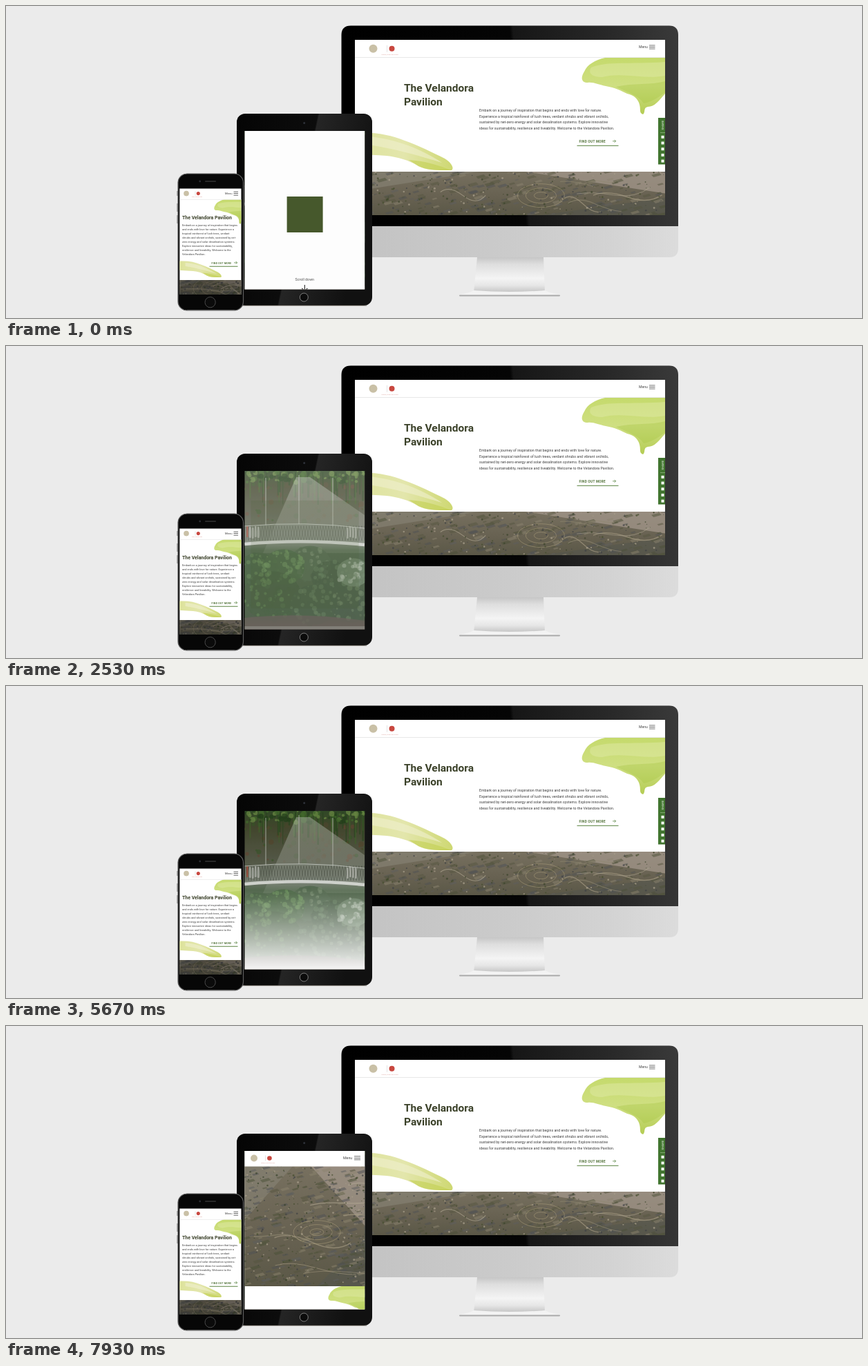
These frames come from a looping animation (1239 px wide and 452 px high, 8000 ms). An HTML page:

```html
<!DOCTYPE html>
<html lang="en">
<head>
<meta charset="utf-8">
<title>Responsive pavilion site</title>
<style>
html, body { margin: 0; width: 100%; height: 100%; overflow: hidden; background: #ebebeb; }
#stage { display: block; width: 100vw; height: 100vh; font-family: Roboto, "Open Sans", sans-serif; }
</style>
</head>
<body>
<svg id="stage" viewBox="0 0 1239 452"></svg>
<script>
const LOOP = 8000;
const NAME = 'Velandora';
const stage = document.getElementById('stage');
const clamp = v => Math.max(0, Math.min(1, v));
const ramp = (t, a, b) => clamp((t - a) / (b - a));

function seeded(seed) {
  return (a = 0, b = 1) => {
    seed = (seed * 16807) % 2147483647;
    return a + (b - a) * seed / 2147483647;
  };
}

// Markup helpers
const rect = (x, y, w, h, fill, more = '') => `<rect x="${x}" y="${y}" width="${w}" height="${h}" fill="${fill}" ${more}/>`;
const dot = (x, y, r, fill, more = '') => `<circle cx="${x}" cy="${y}" r="${r}" fill="${fill}" ${more}/>`;
const shape = (d, fill, more = '') => `<path d="${d}" fill="${fill}" ${more}/>`;
const line = (d, color, width = 1, more = '') => `<path d="${d}" fill="none" stroke="${color}" stroke-width="${width}" ${more}/>`;
const text = (x, y, s, size, fill, more = '') => `<text x="${x}" y="${y}" font-size="${size}" fill="${fill}" ${more}>${s}</text>`;
const group = (id, body, more = '') => `<g id="${id}" ${more}>${body}</g>`;
const screen = (x, y, w, h, body) =>
  `<svg x="${x}" y="${y}" width="${w}" height="${h}" viewBox="${x} ${y} ${w} ${h}">${body}</svg>`;
const gradient = (id, stops, dir = 'x2="0" y2="1"') => `<linearGradient id="${id}" ${dir}>` +
  stops.map(([at, color, alpha = 1]) => `<stop offset="${at}" stop-color="${color}" stop-opacity="${alpha}"/>`).join('') +
  '</linearGradient>';
const title = (x, y, s, size) => text(x, y, s, size, '#3b4129', 'font-weight="700"');
const lines = (x, y, step, size, rows) => rows.map((s, i) => text(x, y + i * step, s, size, '#3c3c3c')).join('');
const leaf = (x, y, k) => `<use href="#leaf" transform="translate(${x} ${y}) scale(${k})"/>`;
const swoosh = (x, y, k) => `<use href="#swoosh" transform="translate(${x} ${y}) scale(${k})"/>`;

const defs = `<defs>
  ${gradient('bezel', [[0, '#000'], [.5, '#050505'], [.51, '#161616'], [.8, '#292929'], [1, '#3a3a3a']], 'x1="0" y1=".05" x2="1" y2="0"')}
  ${gradient('chin', [[0, '#c2c2c2'], [.5, '#cbcbcb'], [.8, '#d3d3d3'], [1, '#dcdcdc']], '')}
  ${gradient('neck', [[0, '#c6c6c6'], [.2, '#dedede'], [.6, '#f4f4f4'], [.8, '#e6e6e6'], [1, '#c4c4c4']])}
  ${gradient('glass', [[0, '#050505'], [.55, '#0c0c0c'], [.56, '#252525'], [1, '#111']], 'x2="1" y2=".3"')}
  ${gradient('lime', [[0, '#c5da6c'], [.5, '#cfdf82'], [1, '#b4cc54']])}
  ${gradient('straw', [[0, '#dde39c'], [.5, '#e3e6ac'], [1, '#ced872']], '')}
  ${gradient('mist', [[0, '#fff', 0], [.45, '#fff', .5], [.8, '#fff', .9], [1, '#fff', 1]])}
  ${gradient('land', [[0, '#77705f'], [.55, '#686252'], [1, '#5b5847']])}
  ${gradient('grove', [[0, '#35502a'], [.1, '#474c30'], [.3, '#5a5e4b'], [.45, '#667060'], [.5, '#375230'], [.92, '#2b4225'], [1, '#4a4038']])}
  ${gradient('beam', [[0, '#c3cabf', .45], [1, '#dfe4dc', .1]])}
  <g id="leaf">
    ${shape('M121 0H34C20 3 8 10 4 20C-1 28 -1 36 9 36C18 35 24 39 35 41C48 43 58 48 66 52C76 54 82 60 84 68C86 75 83 80 89 82C93 79 89 72 96 71C106 71 112 62 121 52Z', 'url(#lime)')}
    ${shape('M14 14C40 4 70 10 121 6V26C90 32 60 20 30 28C18 28 8 24 14 14Z', '#dfe8a8', 'opacity=".45"')}
    ${shape('M50 42C75 36 100 40 121 34V50C108 60 100 64 90 66C82 54 66 50 50 42Z', '#a9c546', 'opacity=".4"')}
  </g>
  <g id="swoosh">
    ${shape('M0 3C28 1 52 6 72 14C92 21 112 31 130 40C140 46 144 54 140 57C124 57 106 58 92 51C78 42 62 38 46 36C30 35 14 34 0 33Z', 'url(#straw)')}
    ${shape('M20 8C60 12 96 26 126 46C100 38 60 26 20 20Z', '#f0f1cf', 'opacity=".6"')}
    ${shape('M78 42C100 43 122 50 140 57C124 57 106 58 92 51Z', '#c3d052', 'opacity=".6"')}
  </g>
</defs>`;

// Aerial view: tinted ground, lots in rows, winding roads and trees
function aerial(x, y, w, h, count, seed) {
  const rnd = seeded(seed);
  const pick = list => list[Math.floor(rnd(0, list.length))];
  let out = rect(x, y, w, h, 'url(#land)');
  out += shape(`M${x + w * .55} ${y}H${x + w}V${y + h * .5}Z`, '#a2968a', 'opacity=".75"');
  out += shape(`M${x} ${y}H${x + w * .4}L${x} ${y + h * .45}Z`, '#858072', 'opacity=".7"');
  out += shape(`M${x + w * .6} ${y + h}L${x + w} ${y + h * .6}V${y + h}Z`, '#55574f', 'opacity=".6"');
  for (let i = 0; i < count; i++) {
    const bx = x + rnd(-.05, 1) * w, by = y + rnd(0, 1) * h, s = rnd(2, 7);
    out += shape(`M${bx} ${by}l${s * 1.8} ${-s * .5}l${s * .5} ${s * .5}l${-s * 1.8} ${s * .5}Z`,
      pick(['#4f5154', '#5d5e5e', '#4b5037', '#8c836f', '#55553f']), 'opacity=".5"');
  }
  for (let i = 0; i < 7; i++) {
    const px = x + rnd(0, 1) * w, py = y + rnd(.1, .9) * h, reach = rnd(25, 60);
    out += line(`M${px} ${py}q${reach * .4} ${rnd(-14, 2)} ${reach} ${rnd(-4, 8)}t${reach} ${rnd(-16, 16)}`,
      pick(['#a89d84', '#b3a994', '#8f8770']), rnd(.7, 1.6), 'opacity=".65"');
  }
  for (let i = 0; i < 3; i++)
    out += `<ellipse cx="${x + w * .6}" cy="${y + h * .55}" rx="${10 + i * 12}" ry="${5 + i * 6}" fill="none" stroke="#b0a27e" opacity=".5"/>`;
  for (let i = 0; i < count; i++)
    out += dot(x + rnd(0, w), y + rnd(0, h), rnd(.5, 1.5), pick(['#3a432b', '#454d2e', '#a99f8b', '#3f4044']), 'opacity=".7"');
  return screen(x, y, w, h, out);
}

// Indoor garden with a footbridge
function garden() {
  const rnd = seeded(77);
  const tree = (cx, cy, r, dark, light) => {
    let s = `<ellipse cx="${cx}" cy="${cy}" rx="${r}" ry="${r * .85}" fill="${dark}" opacity=".75"/>`;
    for (let i = 0; i < r * 2.2; i++) {
      const a = rnd(0, 6.28), d = r * Math.sqrt(rnd());
      const dy = Math.sin(a) * d * .85;
      s += dot(cx + Math.cos(a) * d, cy + dy, rnd(1, 4), rnd(-1, 1) * r > dy ? light : dark, 'opacity=".55"');
    }
    return s;
  };
  let out = rect(345, 181, 175, 230, 'url(#grove)');
  for (let i = 0; i < 90; i++) {
    const x = rnd(346, 519);
    out += dot(x, rnd(200, 255), rnd(1, 4), ['#5a4a2e', '#3b5a2b', '#6d4a36'][i % 3], `opacity="${x < 400 || x > 490 ? .6 : .25}"`);
  }
  for (let i = 0; i < 46; i++)
    out += line(`M${rnd(346, 519)} 183v${rnd(10, 48)}`, i % 2 ? '#456b30' : '#2b4a20', rnd(1, 3), 'opacity=".6"');
  for (let i = 0; i < 90; i++)
    out += dot(rnd(346, 519), rnd(181, 198), rnd(1, 4), ['#26451d', '#47712f', '#6f9147'][i % 3], 'opacity=".75"');
  out += shape('M420 190H440L519 245V300H372Z', 'url(#beam)');
  out += line('M376 191V260M424 187V258M473 191V262', '#d0d2ca', .8);
  out += shape('M345 262Q432 252 519 264V287Q432 278 345 287Z', '#8a9184', 'opacity=".5"');
  for (let x = 347; x < 519; x += 4) out += line(`M${x} 261l4 21m0 -22l-4 22`, '#3f463c', .4);
  for (let i = 0; i < 9; i++)
    out += rect(348 + i * 4 + (i > 4 ? 125 : 0), 261 + i % 3, 2.5, 16, i ? '#c9cbc3' : '#b54836', 'rx="1" opacity=".7"');
  out += tree(440, 315, 30, '#3a5634', '#6b8460') + tree(470, 335, 28, '#2a4426', '#4e6f45') +
    tree(365, 325, 30, '#294a22', '#4f7d3c') + tree(402, 320, 30, '#2f5327', '#5c8a47') +
    tree(385, 362, 42, '#26441f', '#4a7638') + tree(445, 375, 34, '#2a4625', '#4a6b40') +
    tree(500, 375, 30, '#2a4327', '#56744c') + tree(503, 328, 24, '#5e7a58', '#b3c2ac');
  out += line('M345 261Q432 253 519 264', '#d9dcd6', .8);
  out += line('M345 287Q432 279 519 288', '#dcdfd9', 4.5);
  out += shape('M345 394Q430 385 519 398V411H345Z', '#4b4038', 'opacity=".75"');
  return out + rect(345, 406, 175, 5, '#8d8f86', 'opacity=".5"');
}

const burger = (x, y, w, gap) => [-gap, 0, gap].map(d => rect(x, y + d - .4, w, .8, '#444')).join('');

function header(x, y, k, menuX, menuSize, barX, barW, menuY) {
  return dot(x, y, 6 * k, '#c9c0a6') +
    dot(x + 27 * k, y, 4 * k, '#c8473f') +
    rect(x + 20 * k, y - 5 * k, .4, 10 * k, '#bbb') +
    text(x + 12 * k, y + 9 * k, 'Gather, grow and share', 2.4 * k, '#d89a94') +
    text(menuX, menuY + menuSize * .35, 'Menu', menuSize, '#444') + burger(barX, menuY, barW, 2.5);
}

function button(x, y, size, width, arrowX) {
  return text(x, y, 'FIND OUT MORE', size, '#4b6d32', 'font-weight="700" letter-spacing=".35"') +
    line(`M${arrowX} ${y - 1.7}h4.6m-2 -2l2 2l-2 2`, '#4b7a33', .7) +
    rect(x - 3, y + size * .95, width, 1, '#5b8442');
}

function monitor() {
  let page = rect(505, 49, 449, 254, '#fff') + leaf(833, 75, 1) + swoosh(505, 181, 1) +
    rect(505, 74, 449, .8, '#e3e3e3') + header(531.5, 61.8, 1, 916, 5.1, 931, 8.5, 59.5) +
    title(576, 124, `The ${NAME}`, 15.5) + title(576, 144, 'Pavilion', 15.5) +
    lines(685, 153, 8.67, 5.27, [
      'Embark on a journey of inspiration that begins and ends with love for nature.',
      'Experience a tropical rainforest of lush trees, verdant shrubs and vibrant orchids,',
      'sustained by net-zero energy and solar desalination systems. Explore innovative',
      `ideas for sustainability, resilience and liveability. Welcome to the ${NAME} Pavilion.`]) +
    button(829.5, 197.5, 4.6, 60, 878) + aerial(505, 240, 449, 63, 260, 4242) +
    rect(944, 162, 10, 67.5, '#41752f') +
    text(0, 0, 'SHARE', 4, '#fff', 'transform="translate(952.4 179.5) rotate(-90)" letter-spacing=".3"') +
    rect(947, 183, 7, .6, '#a9c59c');
  for (let i = 0; i < 5; i++) page += rect(948.5, 187.8 + i * 8.7, 4, 4, '#fff');
  return shape('M682 364H778L780 415H677Z', 'url(#neck)') +
    shape('M677 412Q728 416 780 412Q788 416 802 418V420H656V418Q670 416 677 412Z', '#f3f3f3') +
    rect(656, 418.6, 146, 1.8, '#a9a9a9', 'rx=".8"') +
    shape('M485.5 318H973V351Q973 364 960 364H498.5Q485.5 364 485.5 351Z', 'url(#chin)') +
    shape('M485.5 319V42Q485.5 28.5 499 28.5H960Q973 28.5 973 42V319Z', 'url(#bezel)') +
    screen(505, 49, 449, 254, page);
}

function tablet() {
  const captions = [
    ['NATURE', 'Living in harmony with the green all around us'],
    ['NURTURE', 'Growing and sharing the ideas of our people'],
    ['FUTURE', 'Innovating and shaping the future of the world']
  ].map(([head, sub], i) => {
    const y = 252 + (i - 2) * 230;
    return text(352, y, head, 11, '#fff', 'font-weight="700" letter-spacing=".8"') +
      text(352, y + 10, sub, 5.2, '#fff', 'letter-spacing=".4" opacity=".75"');
  }).join('');

  const controls = line('M416 407h-5m2 -2l-2 2l2 2M449 407h5m-2 -2l2 2l-2 2', '#fff', .9) +
    [426, 432.4, 438.8].map(x => dot(x, 407, 1.9, '#fff')).join('');

  const page = rect(345, 53, 175, 166, 'url(#mist)') + rect(345, 218.5, 175, 500, '#fff') +
    group('blot', leaf(-52, 0, .585)) + group('stroke', swoosh(0, 0, .585)) +
    title(352, 265.3, `The ${NAME} Pavilion`, 9) +
    lines(352, 278.7, 7.8, 5.06, [
      'Embark on a journey of inspiration that begins and ends with love for',
      'nature. Experience a tropical rainforest of lush trees, verdant shrubs',
      'and vibrant orchids, sustained by net-zero energy and solar',
      'desalination systems. Explore innovative ideas for sustainability,',
      `resilience and liveability. Welcome to the ${NAME} Pavilion.`]) +
    button(462, 326.8, 4.4, 54, 505.5) +
    aerial(345, 358, 175, 174, 300, 991) + rect(345, 358, 175, 174, '#1c1c18', 'id="dim"') +
    group('controls', controls) + leaf(466, 532, .585);

  const intro = group('logo', rect(-26, -26, 52, 52, '#46582c')) +
    group('hint', text(432.3, 395, 'Scroll down', 5.3, '#555', 'text-anchor="middle"') +
      line('M432.3 401.5v9m-4 -4l4 4l4 -4', '#222', 1.1));

  return rect(334, 156, 196, 278, 'url(#glass)', 'rx="12"') +
    line('M342 434H522', '#6d665c', .8) +
    dot(431.7, 169.5, 1.5, '#2d3038') +
    dot(431.3, 422, 6, '#0b0b0b', 'stroke="#8a8a8a" stroke-width=".9"') +
    screen(345.5, 181, 173.7, 229.5, garden() + rect(345, 181, 175, 230, '#000', 'id="shade"') +
      group('captions', captions) + group('page', page) +
      group('bar', rect(345, 181, 175, 22.5, '#fff') + header(359, 191.5, .83, 488, 5.3, 504, 9, 191.3)) +
      rect(345, 181, 175, 230, '#fdfdfd', 'id="veil"') + intro);
}

function phone() {
  const page = rect(251, 264, 90, 154, '#fff') + leaf(301, 280.5, .43) + swoosh(251, 368.5, .43) +
    rect(251, 280, 90, .6, '#e3e3e3') + header(261, 271.6, .64, 317, 4.2, 329.5, 6.5, 271.6) +
    title(255, 309.3, `The ${NAME} Pavilion`, 6.95) +
    lines(255, 319.4, 5.9, 3.95, [
      'Embark on a journey of inspiration that begins',
      'and ends with love for nature. Experience a',
      'tropical rainforest of lush trees, verdant',
      'shrubs and vibrant orchids, sustained by net-',
      'zero energy and solar desalination systems.',
      'Explore innovative ideas for sustainability,',
      'resilience and liveability. Welcome to the',
      `${NAME} Pavilion.`]) +
    button(297.5, 373.6, 3.3, 41, 330) +
    aerial(251, 397, 90, 22, 60, 55) + rect(251, 397, 90, 22, '#1c1c18', 'opacity=".42"');
  return [[268, 7], [286, 12], [303, 12]].map(([y, h]) => rect(247.3, y, 2, h, '#9a9a9a')).join('') +
    rect(249, 243, 94.5, 198, '#070707', 'rx="13" stroke="#5d5d5d" stroke-width="1.2"') +
    line('M262 441H331', '#a8a8a8', .8) +
    dot(280.7, 254, 1.4, '#2b2d33') + rect(288, 253.3, 16, 1.5, '#343434', 'rx=".7"') +
    dot(295.6, 429.2, 7.6, '#0b0b0b', 'stroke="#4a4a4a"') +
    screen(251.3, 264.5, 89.2, 153.5, page);
}

stage.innerHTML = defs + rect(0, 0, 1239, 452, '#ebebeb') + monitor() + tablet() + phone();

const $ = id => document.getElementById(id);
const place = (id, value) => $(id).setAttribute('transform', value);
const fade = (id, value) => $(id).setAttribute('opacity', value);

const SCROLL = [[5000, 385], [6000, 137], [6800, 0], [7330, -75], [7470, -75], [7930, -155]];
function scrollAt(t) {
  const i = SCROLL.findIndex(([time]) => time > t);
  if (i === 0) return SCROLL[0][1];
  if (i < 0) return SCROLL[SCROLL.length - 1][1];
  const [t0, y0] = SCROLL[i - 1], [t1, y1] = SCROLL[i];
  return y0 + (y1 - y0) * (t - t0) / (t1 - t0);
}

function draw(t) {
  // Intro: bouncing hint, then the emblem grows while the veil lifts
  const veil = 1 - ramp(t, 1850, 2700);
  const grow = 1 + 2 * (Math.max(0, t - 1800) / 730) ** 2;
  fade('veil', veil);
  fade('logo', veil ** 1.2);
  place('logo', `translate(432.6 302) scale(${grow})`);
  place('hint', `translate(0 ${1.25 * (1 + Math.cos(t / 1066.7 * 2 * Math.PI))})`);
  fade('hint', 1 - ramp(t, 1800, 2050));

  // Captions pass over the shaded garden
  fade('shade', .22 * ramp(t, 2300, 2900) * (1 - ramp(t, 5250, 5950)));
  place('captions', `translate(0 ${(5070 - t) * .25})`);
  fade('captions', ramp(t, 2500, 2750));

  // Page content scrolls in
  place('page', `translate(0 ${t < 5000 ? 600 : scrollAt(t)})`);
  const reveal = ramp(t, 5700, 6800);
  place('blot', `translate(519 225) scale(${.48 + .52 * reveal} ${reveal})`);
  place('stroke', `translate(345 318) scale(${ramp(t, 6730, 7830)} 1)`);
  fade('dim', .45 * (1 - ramp(t, 6900, 7700)));
  fade('controls', 1 - ramp(t, 6950, 7500));
  const bar = ramp(t, 6250, 6950);
  place('bar', `translate(0 ${-23 * (1 - bar)})`);
  fade('bar', bar);
}

function tick() {
  draw(performance.now() % LOOP);
  requestAnimationFrame(tick);
}
tick();
</script>
</body>
</html>
```
